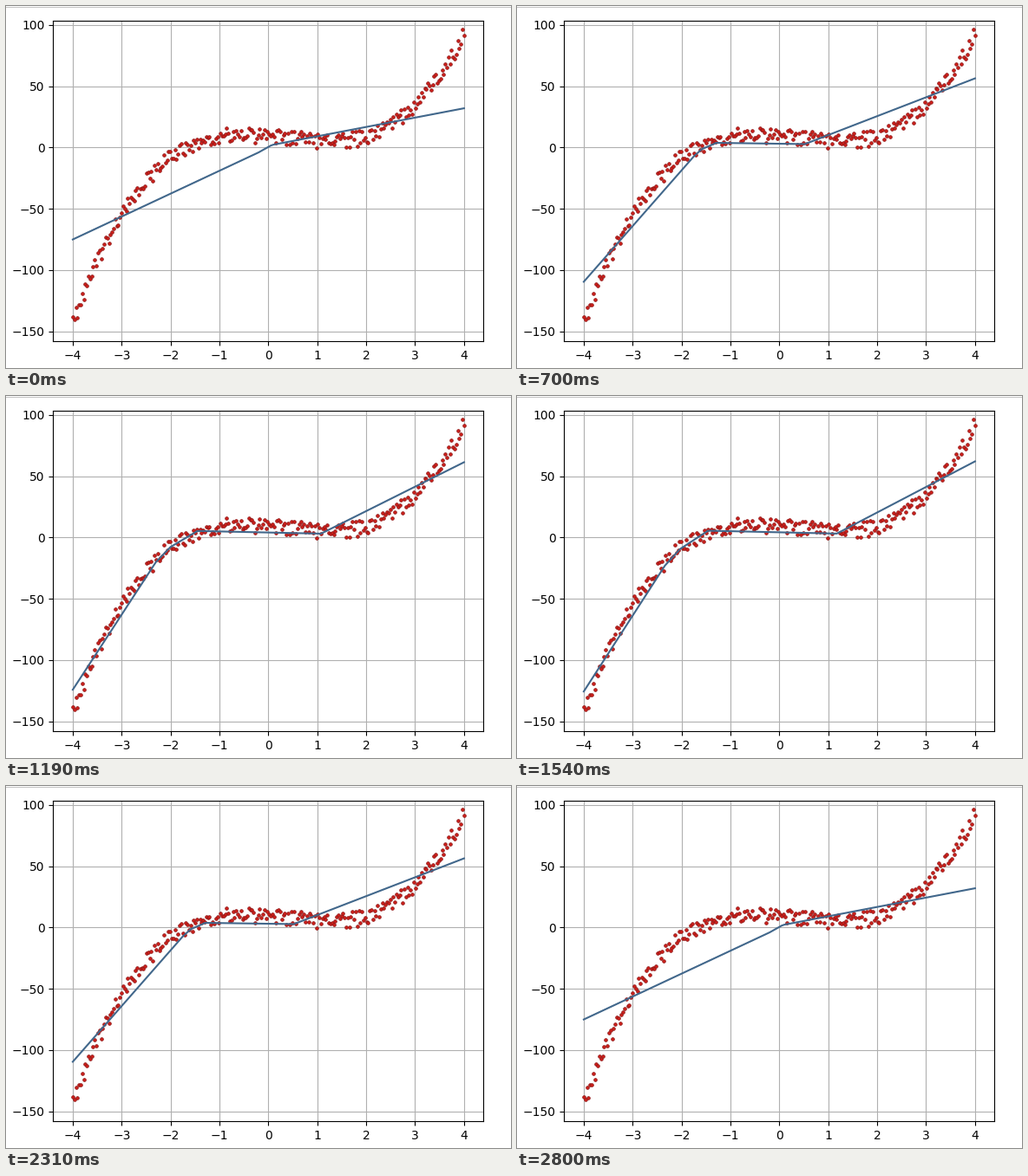
Write a matplotlib script that moves like this. It is 582 by 418 pixels and loops after 2.87 s.

```python
import numpy as np
import matplotlib.pyplot as plt
from matplotlib.animation import FuncAnimation
from matplotlib.lines import Line2D

W, H, DPI = 582, 418, 100
FRAMES, INTERVAL = 41, 70
LEFT, TOP, AX_W, AX_H = 54.4, 17.3, 496, 369.5

plt.rcParams["font.family"] = "DejaVu Sans"
plt.rcParams["font.size"] = 10


def stage_at(frame):
    """Training runs forward, then rewinds to the start."""
    return np.interp(frame, [0, 20, 26, 33, 40], [0, 20, 14, 10, 0])


def curve(u):
    """Piecewise linear fit after u training steps."""
    start = np.array([-4, -75 - 4.25 * u + 0.08 * u**2])
    steep_end = np.array([-0.2 - 0.2 * u + 0.0045 * u**2,
                          -4 - 16 * (u / 17)**3])
    flat_start = np.array([-1.5 + 1.55 * np.exp(-u / 5), 1.6 + 0.22 * u])
    shoulder = steep_end + 0.35 * (flat_start - steep_end) + [0, 0.2 * u]
    flat_end = np.array([0.1 + 0.02 * u + 0.0022 * u**2, 2.3 + 0.05 * u])
    end = np.array([4, 49.5 + 0.7 * u - 17.5 * np.exp(-u / 2)])
    return np.transpose([start, steep_end, shoulder, flat_start, flat_end, end])


def samples(n=250):
    rng = np.random.default_rng(4)
    x = np.linspace(-4, 4, n)
    return x, np.polyval([2.1, -2.2, -4, 9.5], x) + rng.uniform(-6.5, 6.5, n)


fig = plt.figure(figsize=(W / DPI, H / DPI), dpi=DPI, facecolor="white")
ax = fig.add_axes([LEFT / W, 1 - (TOP + AX_H) / H, AX_W / W, AX_H / H])
ax.set_xlim(-4.4, 4.4)
ax.set_ylim(-157.8, 103.2)
ax.set_xticks(range(-4, 5))
ax.set_yticks(range(-150, 101, 50))
ax.grid(True, color="#b0b0b0", linewidth=0.8)
ax.set_axisbelow(True)

# Faint window edge along the top
fig.add_artist(Line2D([0, 1], [1 - 0.5 / H] * 2, color="#c4c4c4", linewidth=0.72))

ax.plot(*samples(), "o", markersize=2.6, markerfacecolor="#d4201a",
        markeredgecolor="#901616", markeredgewidth=0.6, zorder=2)
fit, = ax.plot([], [], color="#41678b", linewidth=1.5, zorder=3)


def draw(frame):
    fit.set_data(*curve(stage_at(frame)))
    return fit,


anim = FuncAnimation(fig, draw, frames=FRAMES, interval=INTERVAL,
                     repeat=True, repeat_delay=0, blit=False)
plt.show()
```
